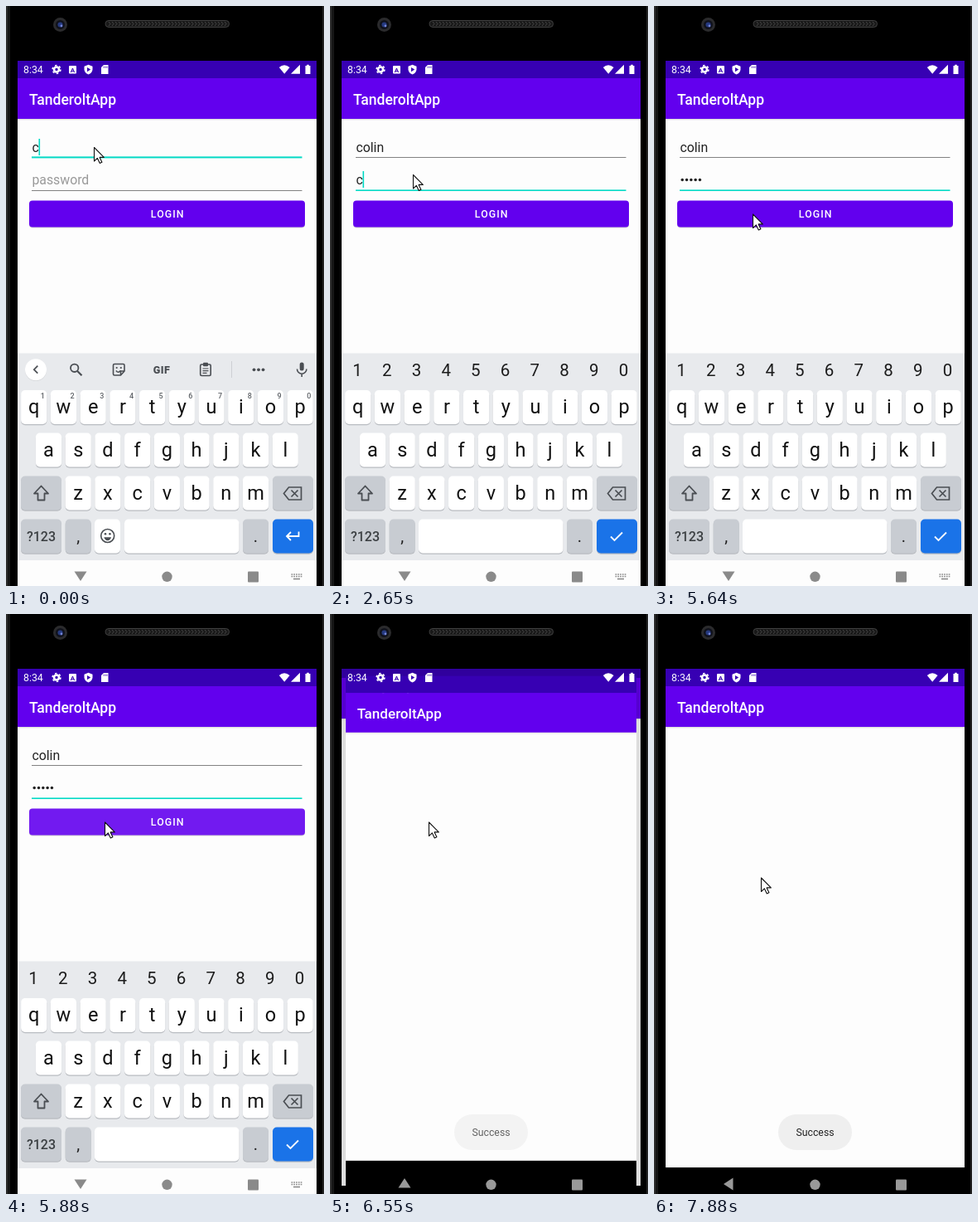
Write an HTML page that moves like this. It is 384x699 px and loops after 8000 ms.

```html
<!DOCTYPE html>
<html lang="en">
<head>
<meta charset="utf-8">
<title>Login demo</title>
<style>
html, body { margin: 0; width: 100%; height: 100%; overflow: hidden; background: #000; }
svg { display: block; width: 384px; height: 699px; font-family: Roboto, sans-serif; }
text { white-space: pre; }
</style>
</head>
<body>
<svg id="stage" viewBox="0 0 384 699" xmlns="http://www.w3.org/2000/svg"></svg>
<script>
const LOOP = 8000;
const stage = document.getElementById('stage');

const rect = (x, y, w, h, fill, r = 0, more = '') =>
  `<rect x="${x}" y="${y}" width="${w}" height="${h}" rx="${r}" fill="${fill}" ${more}/>`;
const circle = (x, y, r, fill, more = '') =>
  `<circle cx="${x}" cy="${y}" r="${r}" fill="${fill}" ${more}/>`;
const path = (d, fill, more = '') => `<path d="${d}" fill="${fill}" ${more}/>`;
const line = (d, color, w, more = '') =>
  path(d, 'none', `stroke="${color}" stroke-width="${w}" ${more}`);
const text = (s, x, y, size, fill, more = '') =>
  `<text x="${x}" y="${y}" font-size="${size}" fill="${fill}" ${more}>${s}</text>`;
const mid = 'text-anchor="middle"';
const group = (id, body, more = '') => `<g id="${id}" ${more}>${body}</g>`;

function phone() {
  let s = rect(0, 0, 384, 699, '#000') + rect(0, 0, 2, 699, '#2c2c2c') +
    rect(2, 0, 3, 699, '#151515') + rect(382, 0, 2, 699, '#202020');
  s += circle(65.5, 22.5, 8.5, '#2b2b2d') + circle(65.5, 22.5, 5.5, '#10121c') +
    circle(65.5, 22.5, 3, '#263a80') + circle(67, 24, 1.4, '#7385d8');
  s += rect(120, 17.5, 149.5, 8, '#191919', 4, 'stroke="#404040"');
  for (let x = 124; x < 267; x += 4) s += line(`M${x} 19l2 2.5l-2 2.5`, '#484848', 1);
  return s;
}

function appBar() {
  return rect(14, 66, 361, 21, '#3700b3') + rect(14, 136, 361, 1, '#dedede') +
    rect(14, 137, 361, 1, '#f2f2f2') + rect(14, 87, 361, 49, '#6200ee') +
    text('TanderoltApp', 28, 118.8, 17.57, '#fff', 'font-weight="500"');
}

function statusIcons() {
  const w = '#fff';
  return text('8:34', 21, 81, 12.3, w) +
    circle(61, 76.5, 3, 'none', `stroke="${w}" stroke-width="2.6"`) +
    circle(61, 76.5, 4.9, 'none', `stroke="${w}" stroke-width="1.6" stroke-dasharray="2.4 2.73"`) +
    rect(76, 72, 9, 9.5, w, 1) + text('A', 80.5, 79.8, 8, '#3700b3', mid + ' font-weight="700"') +
    path('M99.5 70.7l5 2v4q-.5 4-5 5.800q-4.500-1.800-5-5.800v-4z', w) + path('M98 74l4.200 2.600l-4.200 2.600z', '#3700b3') +
    path('M118 71h5.500v11h-8.500v-8z', w) + line('M118.200 72.700v2M120.200 72.700v2M122 72.700v2', '#3700b3', .8) +
    path('M329.800 74q6.200-5.400 12.800 0l-6.400 7.800z', w) + path('M355 70.800v11h-11z', w) +
    path('M361.500 72h1.700v-1.200h2.600v1.200h1.700v10h-6z', w);
}

function form() {
  return rect(14, 136, 361, 563, '#fdfdfd') + appBar() +
    group('userLine', '') + group('passLine', '') +
    `<text id="user" x="31.500" y="176" font-size="15.800" fill="#222"></text>` +
    text('password', 31.5, 215.3, 15.8, '#999', 'id="hint"') +
    `<text id="pass" x="31.500" y="215.300" font-size="15.800" fill="#222"></text>` +
    group('dots', '') + rect(0, 0, 1.6, 20, '#03dac5', 0, 'id="caret"') +
    rect(28, 235.5, 333, 32, '#d4d4d4', 4) + rect(28, 234.5, 333, 32, '#6200ee', 4) +
    `<clipPath id="btn">${rect(28, 234.5, 333, 32, '#000', 4)}</clipPath>` +
    circle(119, 250, 0, '#fff', 'id="ripple" clip-path="url(#btn)"') +
    text('LOGIN', 195.3, 255, 12.3, '#fff', mid + ' font-weight="500" letter-spacing="1.1"');
}

const INK = '#4a4e53';

function key(x, y, w, fill = '#fff') {
  return rect(x, y + 1.2, w, 41, '#b9bcc1', 5) + rect(x, y, w, 41, fill, 5);
}

function keyboard() {
  const P = 35.72, gray = '#c8ccd2';
  let s = rect(14, 418.5, 361, 250, '#e8eaed') + rect(14, 668, 361, 31, '#fdfdfd');
  let small = '', nums = '';
  const row = (letters, cx, y) => [...letters].forEach((c, i) => {
    const x = cx + i * P;
    s += key(x - 15.6, y, 31.2) + text(c, x, y + 28.3, 23.5, '#111', mid);
  });
  row('qwertyuiop', 33.7, 463);
  row('asdfghjkl', 51.5, 514.5);
  row('zxcvbnm', 87.2, 566.5);
  for (let i = 0; i < 10; i++) {
    const n = (i + 1) % 10;
    small += text(n, 44.3 + i * P, 473, 9, '#5f6368', mid + ' font-weight="500"');
    nums += text(n, 33 + i * P, 446, 20.5, '#1c1c1c', mid);
  }
  s += key(18, 566.5, 49, gray) + key(322, 566.5, 49, gray) + key(18, 618.5, 49, gray) +
    key(71.7, 618.5, 31, gray) + key(286, 618.5, 31, gray) + key(322, 618.5, 49, '#1a73e8');
  s += line('M42.500 578.500l8.500 9h-4.500v8h-8v-8h-4.500z', INK, 1.8, 'stroke-linejoin="round"') +
    line('M341.500 580h15v15h-15l-6-7.500zM344.500 583.500l8 8M352.500 583.500l-8 8', INK, 1.7) +
    text('?123', 42.5, 644.5, 16, '#3c4043', mid + ' font-weight="500"') +
    text(',', 87.3, 646, 20, '#222', mid) + text('.', 301.5, 646, 20, '#222', mid);
  const face = circle(122.7, 638.5, 8, 'none', `stroke="${INK}" stroke-width="1.600"`) +
    circle(120, 636.2, 1.3, INK) + circle(125.4, 636.2, 1.3, INK) +
    path('M118.300 640.200h8.800q-1.500 4-4.400 4t-4.400-4z', INK);
  const enter = line('M353.500 633.500v5.500h-14M344 634l-5 5l5 5', '#fff', 1.8);
  const mic = rect(354.7, 429.5, 5, 10, INK, 2.5) +
    line('M351.500 437.500a5.700 5.700 0 0 0 11.400 0M357.200 443v4', INK, 1.6);
  const chip = circle(36, 439, 13, '#d3d5d8') + circle(36, 438.2, 13, '#fff');
  const tools = line('M38.300 433.700l-4.500 4.500l4.500 4.500', INK, 1.7) +
    circle(82.7, 436.3, 4.7, 'none', `stroke="${INK}" stroke-width="1.800"`) +
    line('M86 439.800l5.500 5.500', INK, 2.2) +
    line('M131 431.500h10.500q1.500 0 1.500 1.500v7l-4.500 5h-7.500q-1.500 0-1.500-1.500v-10.500q0-1.500 1.500-1.500zM143 440h-4.500v5', INK, 1.6) +
    circle(133.7, 436, 1.1, INK) + circle(138.8, 436, 1.1, INK) + line('M132.800 439.500q3 3.500 5.500 0', INK, 1.4) +
    text('GIF', 188, 442.5, 12.5, INK, mid + ' font-weight="900" letter-spacing=".500"') +
    rect(234.7, 432, 12.5, 13.5, 'none', 1.5, `stroke="${INK}" stroke-width="1.600"`) +
    rect(238, 429.8, 6, 4.5, INK, 1) + line('M237.500 437h7M237.500 439.700h7M237.500 442.400h5', INK, 1.2) +
    rect(272, 428, 1, 20, '#cdd0d4') +
    [299.5, 305, 310.5].map(x => circle(x, 438.3, 1.9, INK)).join('');
  const words = line('M33.800 433.700l4.500 4.500l-4.500 4.500', INK, 1.7) +
    rect(140, 428, 1, 20, '#cdd0d4') + rect(246, 428, 1, 20, '#cdd0d4') +
    [93.5, 193.5, 293].map((x, i) => text('', x, 444, 15.8, '#3c4043', `id="word${i}" ${mid}`)).join('');
  s += group('normal', small + chip + group('tools', tools) + group('words', words) + mic +
    key(107, 618.5, 31) + face + key(143, 618.5, 138.5) + enter);
  s += group('secure', nums + key(107, 618.5, 174.5) +
    line('M339 639.500l4.500 4.500l9.500-9.500', '#fff', 1.8));
  s += line('M344.500 685h13M344.500 687.500h13', '#8a8a8a', 1.7, 'stroke-dasharray="1.700 1.100"') +
    line('M347 690.500h8', '#8a8a8a', 1.6);
  return s;
}

stage.innerHTML = phone() +
  `<clipPath id="screen">${rect(14, 66, 361, 633, '#000')}</clipPath>` +
  `<g clip-path="url(#screen)">` +
  group('old', form() + rect(14, 66, 361, 633, '#000', 0, 'id="dim" opacity="0"')) +
  group('board', keyboard()) +
  group('fresh', rect(14, 136, 361, 531, '#fdfdfd') + rect(14, 667, 361, 32, '#000') + appBar()) +
  statusIcons() +
  group('nav', path('M-7.500 -5.500h15l-7.500 11.500z', 'inherit', 'id="back"') +
    circle(194.5, 687.8, 6.2, 'inherit') + rect(292, 681.5, 13, 13, 'inherit', 1)) +
  group('toast', rect(150, 603, 89, 43, '#efefef', 21.5) + text('Success', 194.5, 629.2, 12.3, '#222', mid)) +
  '</g>' +
  group('pointer', path('M.5 .5v16.500l3.900-3.600l2.900 6l2.600-1.200l-2.800-5.800h5.200z', '#fff',
    'stroke="#111" stroke-width="1.100" stroke-linejoin="round"'));

const el = {};
stage.querySelectorAll('[id]').forEach(n => el[n.id] = n);
const set = (n, attrs) => { for (const k in attrs) n.setAttribute(k, attrs[k]); };
const show = (n, on) => n.setAttribute('display', on ? 'inline' : 'none');

// value of the last step that has begun: [time, value...]
const step = (t, list) => list.filter(s => s[0] <= t).pop().slice(1);

const TYPED = [[0, 'c', 0], [250, 'co', 2], [490, 'col', 3], [640, 'colin', 4], [930, 'colin', 5], [2100, 'colin', 0]];
const WORDS = [[0, '', '', ''], [250, 'co', 'Co', 'come'], [490, 'col', 'Col', 'cold'],
  [640, 'coli', 'Col', 'cold'], [930, 'colin', 'Colin', 'Colanders']];
// dots shown, then the letter still in clear
const SECRET = [[0, 0, ''], [2650, 0, 'c'], [2900, 1, 'o'], [3050, 2, 'l'], [3200, 3, 'i'], [4040, 4, 'n'], [5520, 5, '']];
const CARET = [[0, 1], [1330, 0], [1840, 1], [3760, 0], [4040, 1], [4540, 0], [5060, 1], [5520, 0], [6030, 1]];
const POINTER = [[0, 106, 170], [1330, 106, 173], [1450, 105, 181], [1570, 102, 192], [1690, 100, 199],
  [1840, 100, 203], [4790, 100, 229], [4940, 105, 246], [5060, 110, 262], [5370, 113, 258], [5520, 119, 250.5], [7880, 129, 317.5]];
const RIPPLE = [[0, 0, 0], [5760, 120, .16], [5880, 260, .1], [6030, 0, 0]];
const TOAST = [[0, 0], [6430, .4], [6550, .7], [6670, .9], [6790, 1]];
// scale of the new page, shift and dimming of the old one, turn of the back key
const OPEN = [[0, 0, 0, 0, 0], [6550, .972, -10, .12, 180], [6670, .994, -16, .12, 120], [6790, 1, 0, 0, 90]];

function fieldLine(node, y, focus) {
  node.innerHTML = focus ? rect(31, y - .6, 326.5, focus, '#03dac5') : rect(31, y, 326.5, 1, '#828282');
}

function draw(t) {
  const inPass = t >= 2100, secure = t >= 2220;
  const [name, under] = step(t, TYPED);
  el.user.innerHTML = `<tspan text-decoration="underline">${name.slice(0, under)}</tspan>${name.slice(under)}`;
  fieldLine(el.userLine, 182, inPass ? 0 : 2);
  fieldLine(el.passLine, 222, inPass ? 1.6 : 0);

  const [n, letter] = step(t, SECRET);
  show(el.hint, !n && !letter);
  el.dots.innerHTML = Array.from({ length: n }, (_, i) => circle(34.2 + i * 5.3, 209.6, 1.75, '#222')).join('');
  el.pass.textContent = letter;
  el.pass.setAttribute('x', 31.5 + n * 5.3);

  const end = inPass
    ? 31.5 + n * 5.3 + (letter ? el.pass.getComputedTextLength() : 0)
    : 31.5 + el.user.getComputedTextLength();
  set(el.caret, { x: end - .3, y: inPass ? 199 : 160 });
  show(el.caret, step(t, CARET)[0]);

  const [r, glow] = step(t, RIPPLE);
  set(el.ripple, { r, opacity: glow });

  show(el.normal, !secure);
  show(el.secure, secure);
  show(el.tools, t < 250);
  show(el.words, t >= 250);
  step(t, WORDS).forEach((w, i) => el['word' + i].textContent = w);

  const [scale, shift, dim, turn] = step(t, OPEN);
  show(el.board, !scale);
  show(el.fresh, scale);
  el.fresh.setAttribute('transform', `translate(194.500 377) scale(${scale || 1}) translate(-194.500 -377)`);
  el.old.setAttribute('transform', `translate(0 ${shift})`);
  el.dim.setAttribute('opacity', dim);
  el.back.setAttribute('transform', `translate(90 ${turn === 180 ? 686 : 687}) rotate(${turn})`);
  el.nav.setAttribute('fill', scale ? '#999' : '#8a8a8a');
  el.toast.setAttribute('opacity', step(t, TOAST)[0]);

  const [px, py] = step(t, POINTER);
  el.pointer.setAttribute('transform', `translate(${px} ${py})`);
}

const start = performance.now();
function tick() {
  draw((performance.now() - start) % LOOP);
  requestAnimationFrame(tick);
}
tick();
</script>
</body>
</html>
```
